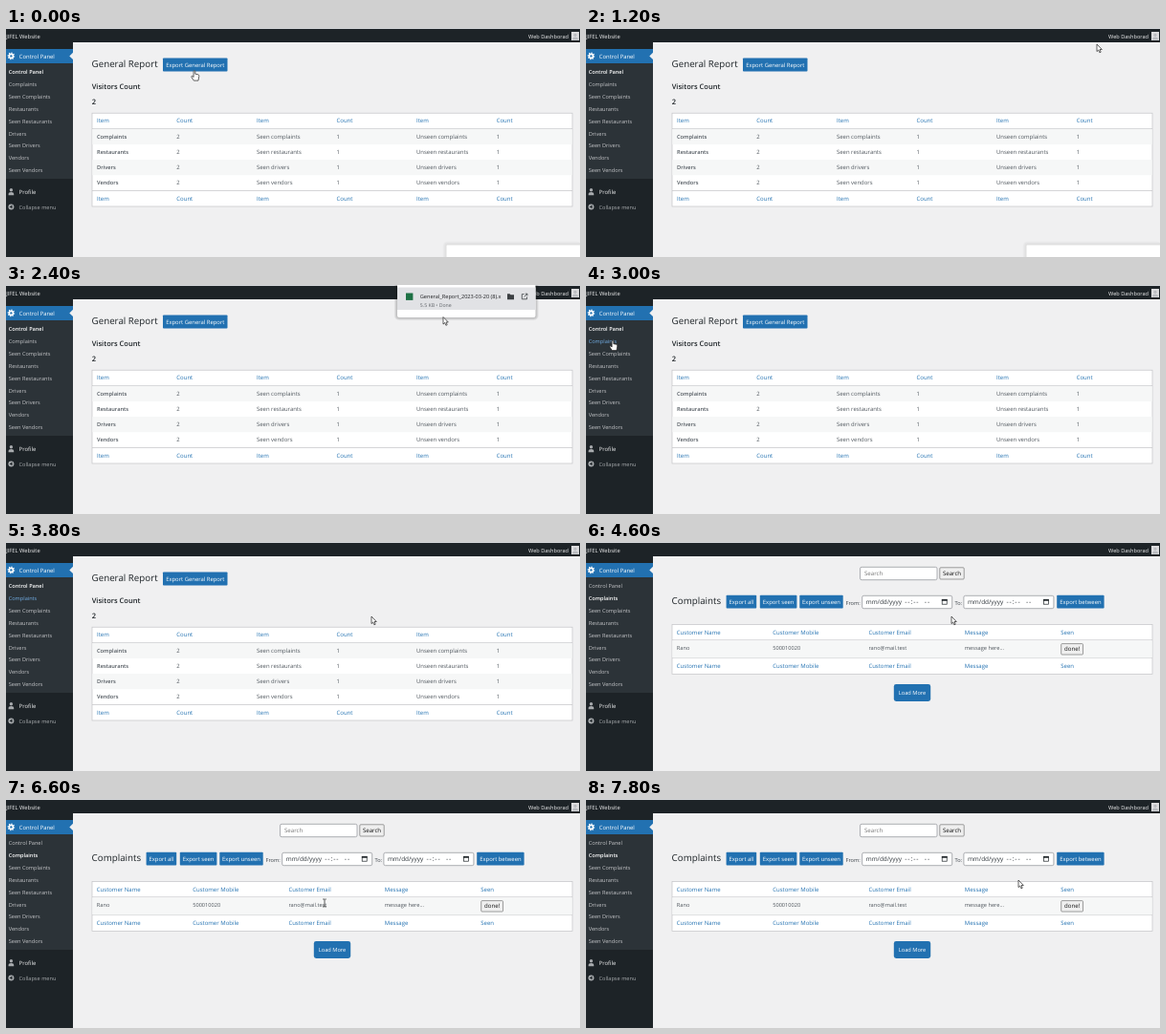
Write an HTML page that moves like this. It is 600 px wide and 240 px high and loops after 8000 ms.

```html
<!DOCTYPE html>
<html lang="en">
<head>
<meta charset="utf-8">
<title>Report dashboard</title>
<style>
  html, body { margin: 0; width: 100%; height: 100%; overflow: hidden; background: #f0f0f1; }
  svg { display: block; width: 100%; height: 100%; }
  text { font-family: "Open Sans", "Noto Sans", sans-serif; text-rendering: geometricPrecision; white-space: pre; }
</style>
</head>
<body>
<svg id="stage" viewBox="0 0 600 240" xmlns="http://www.w3.org/2000/svg"></svg>
<script>
const NS = 'http://www.w3.org/2000/svg';
const LOOP = 8000, STEP = 200;
const BLUE = '#2271b1', DARK = '#1d2327', INK = '#50575e', LINE = '#c3c4c7';
const stage = document.getElementById('stage');

function el(parent, tag, attrs = {}) {
  const node = document.createElementNS(NS, tag);
  for (const key in attrs) node.setAttribute(key, attrs[key]);
  parent.appendChild(node);
  return node;
}
const group = (parent = stage) => el(parent, 'g');
const rect = (g, x, y, width, height, fill, more) => el(g, 'rect', { x, y, width, height, fill, ...more });
const path = (g, d, fill, more) => el(g, 'path', { d, fill, ...more });

function text(g, x, y, str, size, fill, weight = 400, anchor = 'start') {
  const node = el(g, 'text', { x, y, fill, 'font-size': size, 'font-weight': weight, 'text-anchor': anchor });
  node.textContent = str;
  return node;
}

function button(g, x, y, w, h, label, size = 5.9, rx = 0.8) {
  rect(g, x, y, w, h, BLUE, { rx });
  text(g, x + w / 2, y + h / 2 + 2.1, label, size, '#fff', 500, 'middle');
}

function plainButton(g, x, y, w, h, label) {
  rect(g, x, y, w, h, '#efefef', { rx: 1, stroke: '#767676', 'stroke-width': 0.7 });
  text(g, x + w / 2, y + h / 2 + 2.1, label, 6.1, '#111', 400, 'middle');
}

function field(g, x, y, w, h) {
  rect(g, x, y, w, h, '#fff', { rx: 1.6, stroke: '#8c8f94', 'stroke-width': 0.7 });
}

function dateField(g, x) {
  field(g, x, 56.3, 94, 13.4);
  text(g, x + 4, 65.2, 'mm/dd/yyyy', 6.4, '#2c3338');
  text(g, x + 44.5, 65.2, '--:--  --', 6.9, '#2c3338').setAttribute('letter-spacing', 0.9);
  rect(g, x + 83.5, 60.4, 5, 4.8, 'none', { stroke: DARK, 'stroke-width': 0.7 });
  rect(g, x + 83.2, 60, 5.6, 1.7, DARK);
}

function table(g, top, bottom, headLine, footLine, columns, labels) {
  rect(g, 90, top, 502, bottom - top, '#fff', { stroke: LINE, 'stroke-width': 0.7 });
  for (const y of [headLine, footLine]) rect(g, 90, y - 0.35, 502, 0.7, LINE);
  columns.forEach((x, i) => {
    text(g, x, (top + headLine) / 2 + 2.1, labels[i], 6, BLUE);
    text(g, x, (bottom + footLine) / 2 + 2.1, labels[i], 6, BLUE);
  });
}

// Admin frame
const frame = group();
rect(frame, 0, 0, 600, 240, '#f0f0f1');
rect(frame, 0, 0, 70, 240, DARK);
rect(frame, 0, 0, 600, 15, DARK);
rect(frame, 0, 0, 600, 1, '#d5d6d9');
text(frame, 0.2, 10.6, 'JIFEL Website', 5.8, '#f0f0f1');
text(frame, 588, 10.6, 'Web Dashborad', 5.6, '#f0f0f1', 400, 'end');
rect(frame, 591, 4, 8, 9, '#dcdcde');
el(frame, 'circle', { cx: 595, cy: 7.3, r: 1.6, fill: '#b9bbbf' });
path(frame, 'M592 12.5q0-3 3-3t3 3z', '#b9bbbf');

rect(frame, 0, 22, 70, 15, BLUE);
path(frame, 'M70 25.7L66.3 29.4L70 33.1z', '#f0f0f1');
el(frame, 'circle', { cx: 5.4, cy: 29.4, r: 2, fill: 'none', stroke: '#fff', 'stroke-width': 1.6 });
el(frame, 'circle', { cx: 5.4, cy: 29.4, r: 3.2, fill: 'none', stroke: '#fff', 'stroke-width': 1.2, pathLength: 16, 'stroke-dasharray': '1 1' });
text(frame, 13.8, 31.5, 'Control Panel', 5.9, '#fff', 500);
rect(frame, 0, 37, 70, 121, '#2c3338');

const menu = ['Control Panel', 'Complaints', 'Seen Complaints', 'Restaurants', 'Seen Restaurants',
  'Drivers', 'Seen Drivers', 'Vendors', 'Seen Vendors']
  .map((label, i) => text(frame, 2.7, 48.4 + i * 12.83, label, 5.6, LINE));

el(frame, 'circle', { cx: 5.4, cy: 169.8, r: 1.7, fill: '#a7aaad' });
path(frame, 'M2.6 175.2v-1.2q0-2 2.8-2t2.8 2v1.2z', '#a7aaad');
text(frame, 13.6, 174.1, 'Profile', 5.9, '#f0f0f1', 500);
el(frame, 'circle', { cx: 5.4, cy: 187.4, r: 3, fill: '#a7aaad' });
path(frame, 'M6.5 185.5v3.8l-2.8-1.9z', DARK);
text(frame, 13.6, 189.5, 'Collapse menu', 5.6, '#a7aaad');

// General report page
const report = group();
text(report, 89.6, 41, 'General Report', 9.75, DARK);
button(report, 164, 31.5, 67.5, 14, 'Export General Report');
text(report, 89.7, 64, 'Visitors Count', 7.5, DARK, 600);
text(report, 89.7, 79.6, '2', 7.5, DARK, 600);
const cols = [95, 178.3, 262, 345.5, 429, 512.7];
table(report, 89.2, 187, 105.5, 170.5, cols, ['Item', 'Count', 'Item', 'Count', 'Item', 'Count']);
['Complaints', 'Restaurants', 'Drivers', 'Vendors'].forEach((name, i) => {
  const y = 116.1 + i * 16.1, low = name.toLowerCase();
  if (i % 2 === 0) rect(report, 90.4, y - 10.2, 501.2, 16.1, '#f6f7f7');
  text(report, cols[0], y, name, 5.7, INK, 600);
  ['2', 'Seen ' + low, '1', 'Unseen ' + low, '1'].forEach((s, k) => text(report, cols[k + 1], y, s, 5.95, INK));
});

// Complaints page
const complaints = group();
field(complaints, 286.5, 26.3, 80.5, 13.4);
text(complaints, 291, 35.2, 'Search', 6.1, '#757575');
plainButton(complaints, 369.8, 26.8, 25.4, 12.2, 'Search');
text(complaints, 89.6, 65.3, 'Complaints', 9.75, DARK);
button(complaints, 146.6, 55.8, 31.6, 13.8, 'Export all');
button(complaints, 181.8, 55.8, 38.6, 13.8, 'Export seen');
button(complaints, 223.3, 55.8, 45.4, 13.8, 'Export unseen');
text(complaints, 271.5, 66, 'From:', 5.6, '#3c434a');
dateField(complaints, 288.7);
text(complaints, 385.5, 66, 'To:', 5.6, '#3c434a');
dateField(complaints, 394.9);
button(complaints, 492.2, 55.8, 49.4, 13.8, 'Export between');
const cols2 = [94.8, 195.2, 295.4, 395.8, 496.3];
table(complaints, 86.5, 138.6, 102.8, 121.7, cols2,
  ['Customer Name', 'Customer Mobile', 'Customer Email', 'Message', 'Seen']);
rect(complaints, 90.4, 103.2, 501.2, 18.1, '#f6f7f7');
['Rano', '500010020', 'rano@mail.test', 'message here...']
  .forEach((s, i) => text(complaints, cols2[i], 113.4, s, 5.65, INK));
plainButton(complaints, 496.7, 106.6, 22.8, 11.4, 'done!');
button(complaints, 321.8, 149, 38.4, 18, 'Load More', 5.7, 2.4);

// Floating panel at the bottom edge
const panel = group();
for (let i = 4; i > 0; i--) {
  rect(panel, 460.5 - i, 227.5 - i, 145, 20, '#000', { rx: 1 + i, opacity: 0.018 });
}
rect(panel, 460.5, 227.5, 145, 20, '#fff', { rx: 1 });

// Download bubble
const bubble = group();
for (let i = 3; i > 0; i--) {
  rect(bubble, 409 - i, -4, 144.5 + 2 * i, 38 + i, '#000', { rx: 2 + i, opacity: 0.07 });
}
rect(bubble, 409, -4, 144.5, 38, '#fff', { rx: 2 });
rect(bubble, 409, 2.5, 144.5, 23.5, '#e1e2e5');
rect(bubble, 418, 8.5, 7.4, 7.4, '#1e7145');
text(bubble, 432.8, 13.8, 'General_Report_2023-03-20 (8).x', 5.6, '#202124');
text(bubble, 432.8, 23.3, '5.5 KB • Done', 5.2, '#5f6368');
path(bubble, 'M524 9.2h2.6l.9 1h3.5v5h-7z', '#3c4043');
path(bubble, 'M541.6 9.6h-2.3v5.2h5.2v-2.3M542.8 9.2h2.1v2.1M544.7 9.4l-3 3', 'none', { stroke: '#3c4043', 'stroke-width': 0.8 });

// Pointers, each with its hot spot at 0,0
const pointer = group();
const outline = { stroke: '#222', 'stroke-width': 0.7, 'stroke-linejoin': 'round' };
const shapes = {
  arrow: path(pointer, 'M0 0V7.6L1.7 6L2.9 8.8L4.2 8.2L3 5.5H5.3z', '#fff', outline),
  hand: path(pointer, 'M-.9 .7Q0-.5 .8 .7V3.7L4 4.3Q5 4.7 4.8 6L4 10.6H-.7L-3 7.2Q-3.6 5.8-2.2 5.8L-.9 7z', '#fff', outline),
  beam: path(pointer, 'M-1.8-4H-.4L0-3.6L.4-4H1.8M0-3.6V3.6M-1.8 4H-.4L0 3.6L.4 4H1.8', 'none', { stroke: '#333', 'stroke-width': 0.8 })
};

// time, x, y, shape from then on
const route = [
  [0, 197, 44.5, 'hand'], [400, 200, 44.5, 'arrow'], [1000, 530, 18, 'arrow'], [1200, 534, 17, 'arrow'],
  [1800, 534, 17, 'arrow'], [2400, 457, 33.5, 'arrow'], [3000, 28, 58, 'hand'], [3200, 26, 58, 'arrow'],
  [3600, 382, 78, 'arrow'], [4600, 382, 78, 'arrow'], [5200, 165, 65, 'hand'], [5600, 250, 65, 'arrow'],
  [6000, 515, 65, 'arrow'], [6400, 342, 160, 'hand'], [6600, 333, 109, 'beam'], [6800, 334, 109, 'beam'],
  [7200, 420, 111, 'beam'], [7600, 456, 97, 'arrow'], [7800, 452, 85, 'arrow'], [LOOP, 452, 85, 'arrow']
];

function pointerAt(t) {
  let i = 0;
  while (i < route.length - 2 && t >= route[i + 1][0]) i++;
  const [t0, x0, y0, shape] = route[i], [t1, x1, y1] = route[i + 1];
  const u = (t - t0) / (t1 - t0), e = u * u * (3 - 2 * u);
  return { x: x0 + (x1 - x0) * e, y: y0 + (y1 - y0) * e, shape };
}

const show = (node, on) => node.setAttribute('visibility', on ? 'visible' : 'hidden');

function draw(time) {
  const t = Math.floor((time % LOOP) / STEP) * STEP;
  const second = t >= 4200;
  show(report, !second);
  show(complaints, second);
  show(panel, t < 1400);
  show(bubble, t >= 1400 && t < 2600);
  menu.forEach((item, i) => {
    const active = i === (second ? 1 : 0);
    const hover = i === 1 && t >= 3000 && !second;
    item.setAttribute('font-weight', active ? 600 : 400);
    item.setAttribute('fill', active ? '#fff' : hover ? '#72aee6' : LINE);
  });
  const p = pointerAt(t);
  pointer.setAttribute('transform', `translate(${p.x} ${p.y})`);
  for (const name in shapes) show(shapes[name], name === p.shape);
}

const start = performance.now();
function tick() {
  draw(performance.now() - start);
  requestAnimationFrame(tick);
}
tick();
</script>
</body>
</html>
```
